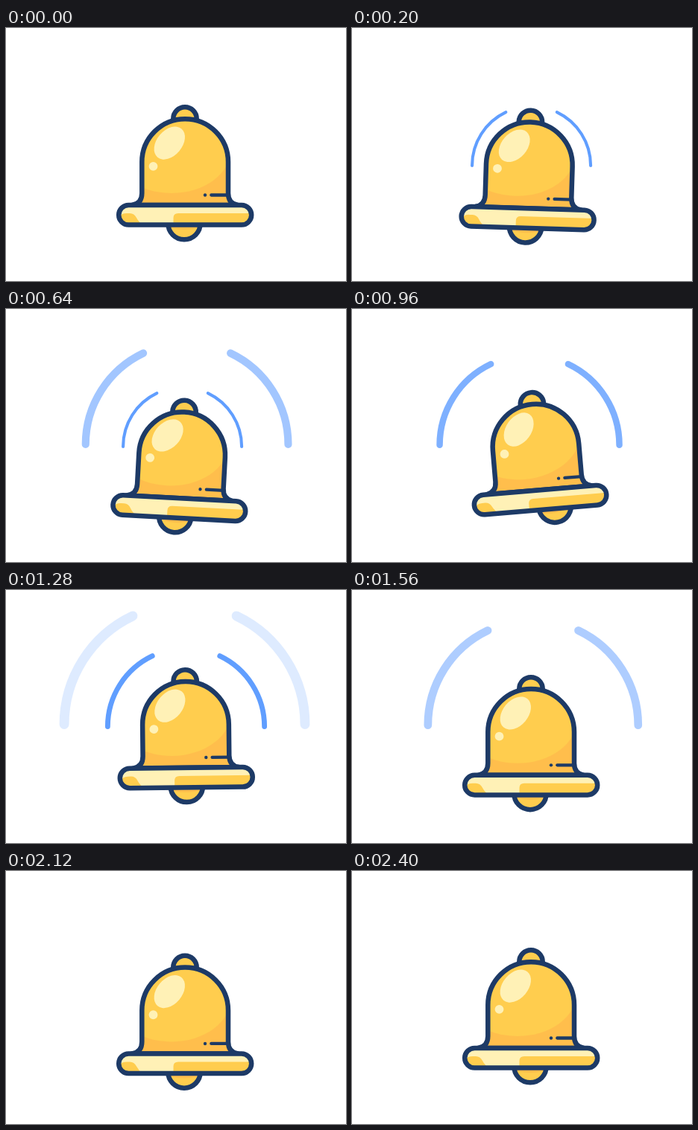
An HTML page that plays this animation: 456x340 px, repeating every 2440 ms.

```html
<!DOCTYPE html>
<html lang="en">
<head>
<meta charset="utf-8">
<title>Ringing bell</title>
<style>
  html, body { margin: 0; width: 100%; height: 100%; overflow: hidden; background: #fff; }
  svg { display: block; width: 100%; height: 100%; }
  .line { stroke: #1d3a66; stroke-width: 6.5; stroke-linejoin: round; stroke-linecap: round; }
  .gold { fill: #ffcd4e; }
  .shade { fill: #ffbe4c; }
  .shine { fill: #fff1b6; }
  .wave { fill: none; stroke: #609eff; stroke-linecap: round; }
</style>
</head>
<body>
<svg viewBox="0 0 456 340">
  <defs>
    <path id="body" d="M169 238Q182.300 236 182.300 222V180A57.850 57.850 0 0 1 298 180V222Q298 236 311 238Z"/>
    <rect id="rim" x="151.200" y="238" width="178" height="26.600" rx="13.300"/>
    <circle id="ball" cx="239" cy="262.600" r="21.700"/>
    <clipPath id="inBody"><use href="#body"/></clipPath>
    <clipPath id="inRim"><use href="#rim"/></clipPath>
    <clipPath id="inBall"><use href="#ball"/></clipPath>
  </defs>
  <path class="wave"/>
  <path class="wave"/>
  <path class="wave"/>
  <g id="bell">
    <g id="clapper">
      <use href="#ball" class="gold"/>
      <ellipse cx="239" cy="265" rx="22" ry="6" class="shade" clip-path="url(#inBall)"/>
      <use href="#ball" class="line" fill="none"/>
    </g>
    <circle cx="240" cy="122" r="15.700" class="gold line"/>
    <use href="#body" class="shade"/>
    <g clip-path="url(#inBody)">
      <ellipse cx="222" cy="162" rx="80" ry="60" class="gold"/>
    </g>
    <ellipse class="shine" rx="25" ry="17" transform="translate(219.300 154.600) rotate(-50)"/>
    <circle class="shine" cx="197.500" cy="185.800" r="5.900"/>
    <use href="#body" class="line" fill="none"/>
    <circle cx="267" cy="224.500" r="2.200" fill="#1d3a66"/>
    <path class="line" d="M275.300 224.500H298" style="stroke-width:4.300"/>
    <use href="#rim" class="shine"/>
    <g class="gold" clip-path="url(#inRim)">
      <path d="M150 256Q154 249 162 249H166Q172 249 175 255T184 265H150Z"/>
      <path d="M330 249H231Q224.500 249 224.500 255V265H330Z"/>
    </g>
    <use href="#rim" class="line" fill="none"/>
  </g>
</svg>
<script>
const LOOP = 2440, END = 2400;
const bell = document.getElementById('bell');
const clapper = document.getElementById('clapper');
const waves = document.querySelectorAll('.wave');
const clamp = x => Math.min(1, Math.max(0, x));
const smooth = p => p * p * (3 - 2 * p);

// Eased value at time t through [time, value] keys.
function keyed(t, keys) {
  for (let i = 1; i < keys.length; i++) {
    const [t0, a] = keys[i - 1], [t1, b] = keys[i];
    if (t < t1) return a + (b - a) * smooth((t - t0) / (t1 - t0));
  }
  return keys[keys.length - 1][1];
}

const bob = [[0, 0], [600, 16.7], [1200, 0], [1800, 16.7], [2400, 0]];
const swing = [[0, 0], [500, 5], [1000, -5], [1360, 0]];
const clap = [[0, 0], [580, 1.9], [1000, -7.4], [1340, 0]];

// A pair of mirrored arcs that widens, thickens and fades.
function drawWave(path, index, t) {
  const r = 105 + 0.128 * (t - 400 - 440 * index);
  const alpha = clamp((r - 66) / 10) * clamp((175 - r) / 67);
  path.setAttribute('opacity', alpha);
  if (!alpha) return;
  const width = 4.1 + 0.107 * (r - 79.4);
  const cx = (index === 1 ? 237.5 : 241.5) + 0.036 * (r - 105);
  const cy = 187 - width / 2;
  const angle = 64.5 * Math.PI / 180;
  const dx = r * Math.cos(angle), y = cy - r * Math.sin(angle);
  path.setAttribute('stroke-width', width);
  path.setAttribute('d',
    `M${cx - r} ${cy}A${r} ${r} 0 0 1 ${cx - dx} ${y}` +
    `M${cx + dx} ${y}A${r} ${r} 0 0 1 ${cx + r} ${cy}`);
}

function draw() {
  const t = Math.min(performance.now() % LOOP, END);
  bell.setAttribute('transform', `translate(0 ${keyed(t, bob)}) rotate(${keyed(t, swing)} 240 104)`);
  clapper.setAttribute('transform', `rotate(${keyed(t, clap)} 240 104)`);
  waves.forEach((path, i) => drawWave(path, i, t));
  requestAnimationFrame(draw);
}
draw();
</script>
</body>
</html>
```
